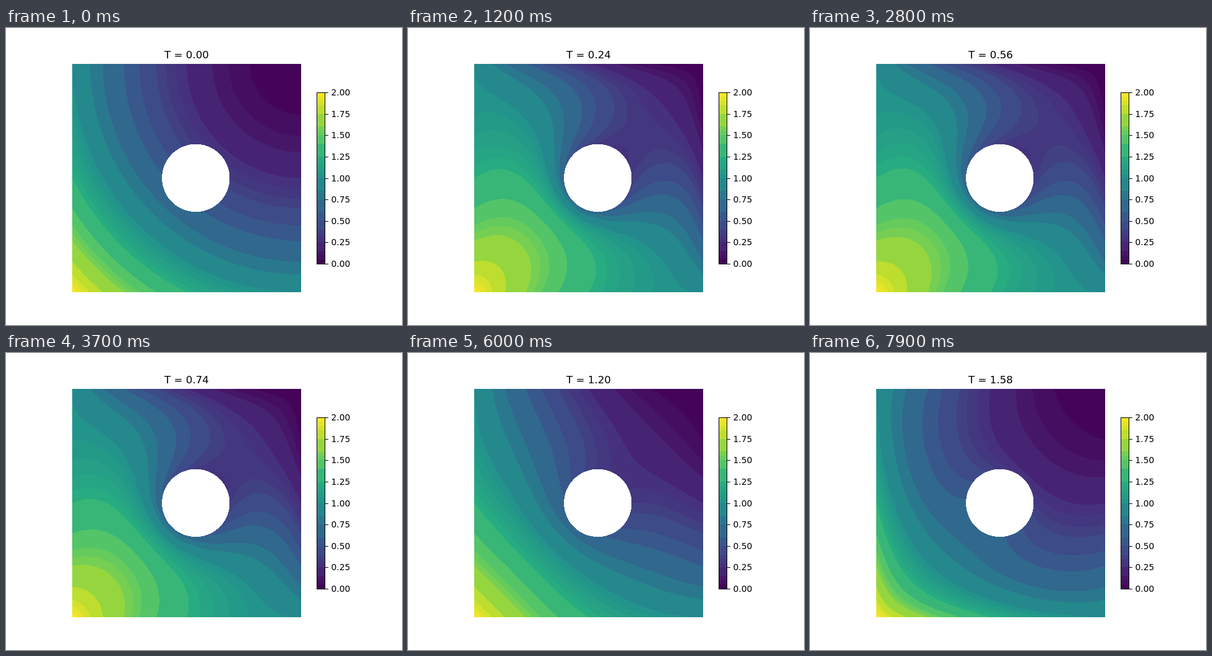
Animation, 640 px wide and 480 px high, one loop 8 s. Source, as an HTML page with a canvas:

```html
<!DOCTYPE html>
<html lang="en">
<head>
<meta charset="utf-8">
<title>Advection and diffusion around a disc</title>
<style>
  html, body { margin: 0; width: 100%; height: 100%; overflow: hidden; background: #fff; }
  canvas, svg { position: absolute; left: 0; top: 0; }
  text { font-family: "DejaVu Sans", sans-serif; font-size: 13.89px; fill: #000; }
  #title { font-size: 16.67px; text-anchor: middle; }
</style>
</head>
<body>
<canvas id="field" width="640" height="480"></canvas>
<svg width="640" height="480" viewBox="0 0 640 480">
  <text id="title" x="292" y="49">T = 0.00</text>
  <g id="bar"></g>
</svg>
<script>
const FRAMES = 80, FRAME_MS = 100, FRAME_T = 0.02, SUBSTEPS = 100;
const N = 92, W = N + 1;
const KAPPA = 0.12, SPEED = 0.89, OMEGA = 1.52;
const BOX = { x: 107.2, y: 57.6, size: 369.6 };
const DISC = { x: 0.54, y: 0.5, r: 0.148 };

// Viridis, interpolated between nine stops
const STOPS = [[68, 1, 84], [71, 45, 123], [59, 82, 139], [44, 114, 142], [33, 145, 140],
  [40, 174, 128], [94, 201, 98], [173, 220, 48], [253, 231, 37]];

function viridis(f) {
  const p = f * 8, k = Math.min(7, Math.floor(p));
  return STOPS[k].map((c, n) => Math.round(c + (STOPS[k + 1][n] - c) * (p - k)));
}

// Contour levels in steps of 0.05; some neighbours share a colour
const EDGES = [0, 1, 2, 3, 5, 6, 7, 8, 10, 12, 15, 17, 20, 21, 22, 23, 24, 25,
  28, 30, 31, 32, 35, 37, 38, 39, 40];
const palette = [];
for (let k = 0; k + 1 < EDGES.length; k++) {
  const color = viridis((EDGES[k] + EDGES[k + 1]) / 80);
  for (let n = EDGES[k]; n < EDGES[k + 1]; n++) palette[n] = color;
}

const boundary = (x, y) => (1 - x) ** 2 + y * y;
const discDist = (x, y) => Math.hypot(x - DISC.x, y - DISC.y);

// Finite differences with fixed values on the square and the disc
function simulate() {
  const h = 1 / N, dt = FRAME_T / SUBSTEPS;
  let u = new Float64Array(W * W);
  const free = [];
  for (let j = 0; j < W; j++) {
    for (let i = 0; i < W; i++) {
      const x = i * h, y = j * h;
      u[j * W + i] = boundary(x, y);
      const inside = i > 0 && j > 0 && i < N && j < N;
      if (inside && discDist(x, y) > DISC.r + 0.3 * h) free.push(j * W + i);
    }
  }
  let next = u.slice();
  const cells = Int32Array.from(free), frames = [];
  const diff = KAPPA * dt / (h * h);
  for (let f = 0; f < FRAMES; f++) {
    frames.push(Float32Array.from(u));
    for (let s = 0; s < SUBSTEPS; s++) {
      const t = f * FRAME_T + s * dt;
      const adv = SPEED * Math.cos(OMEGA * t) * dt / (2 * h);
      const near = diff + adv, far = diff - adv, mid = 1 - 4 * diff;
      for (let n = 0; n < cells.length; n++) {
        const c = cells[n];
        next[c] = mid * u[c] + near * (u[c - 1] + u[c + W]) + far * (u[c + 1] + u[c - W]);
      }
      [u, next] = [next, u];
    }
  }
  return frames;
}

const ctx = document.getElementById("field").getContext("2d");
const X0 = 107, Y0 = 58, PW = 370, PH = 369;
const image = ctx.createImageData(PW, PH);

function drawField(u) {
  const px = image.data;
  for (let r = 0, o = 0; r < PH; r++) {
    const y = (Y0 + r + 0.5 - BOX.y) / BOX.size;
    const j = Math.min(N - 1, Math.floor(y * N)), fy = y * N - j;
    for (let c = 0; c < PW; c++, o += 4) {
      const x = Math.min(1, (X0 + c + 0.5 - BOX.x) / BOX.size);
      px[o + 3] = 255;
      if (discDist(x, y) < DISC.r) {
        px[o] = px[o + 1] = px[o + 2] = 255;
        continue;
      }
      const i = Math.min(N - 1, Math.floor(x * N)), fx = x * N - i, k = j * W + i;
      const top = u[k] + (u[k + 1] - u[k]) * fx;
      const low = u[k + W] + (u[k + W + 1] - u[k + W]) * fx;
      const level = Math.floor((top + (low - top) * fy) * 20);
      const rgb = palette[Math.max(0, Math.min(39, level))];
      px[o] = rgb[0];
      px[o + 1] = rgb[1];
      px[o + 2] = rgb[2];
    }
  }
  ctx.putImageData(image, X0, Y0);
}

function buildBar() {
  const top = 104, height = 277, step = height / 40;
  let out = "";
  palette.forEach((rgb, n) => {
    const y1 = Math.round(top + height - (n + 1) * step), y2 = Math.round(top + height - n * step);
    out += `<rect x="502" y="${y1}" width="14" height="${y2 - y1}" fill="rgb(${rgb})"/>`;
  });
  out += `<rect x="502.5" y="104.5" width="13" height="277" fill="none" stroke="#000"/>`;
  for (let n = 0; n <= 8; n++) {
    const y = Math.round(top + height - n * height / 8) + 0.5;
    out += `<path d="M516 ${y}h5" stroke="#000"/>`;
    out += `<text x="525.5" y="${y + 4.5}">${(n / 4).toFixed(2)}</text>`;
  }
  document.getElementById("bar").innerHTML = out;
}

buildBar();
const frames = simulate();
const title = document.getElementById("title");
const start = performance.now();
let shown = -1;

function tick() {
  const f = Math.floor((performance.now() - start) / FRAME_MS) % FRAMES;
  if (f !== shown) {
    shown = f;
    drawField(frames[f]);
    title.textContent = "T = " + (f * FRAME_T).toFixed(2);
  }
  requestAnimationFrame(tick);
}
tick();
</script>
</body>
</html>
```
